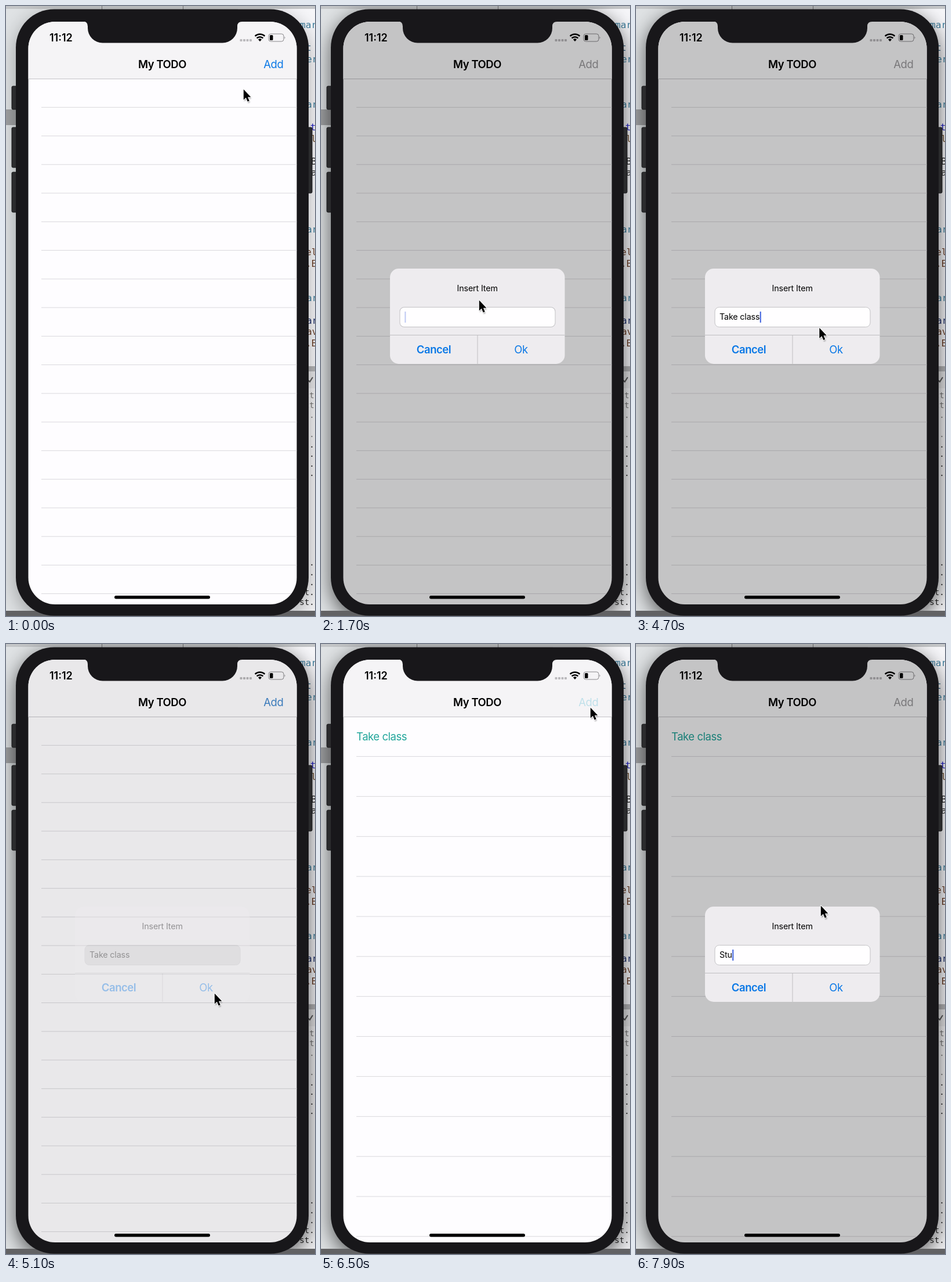
Write an HTML page that moves like this. It is 533x1050 px and loops after 8 s.

```html
<!DOCTYPE html>
<html lang="en">
<head>
<meta charset="utf-8">
<title>My TODO</title>
<style>
  html, body { margin: 0; width: 100%; height: 100%; overflow: hidden; background: #dfe2e4; }
  svg { display: block; width: 100%; height: 100%; }
  text { font: 18.5px Inter, Roboto, sans-serif; letter-spacing: -.45px; white-space: pre; }
  .bold { font-weight: 600; }
  .small { font-size: 14.3px; letter-spacing: -.15px; }
  .mid { text-anchor: middle; }
  .blue { fill: #0a78e6; }
  .code { font: 16.2px "DejaVu Sans Mono", monospace; letter-spacing: 0; }
  .log { font: 14.2px "DejaVu Sans Mono", monospace; letter-spacing: 0; }
</style>
</head>
<body>
<svg viewBox="0 0 533 1050" preserveAspectRatio="none">
  <defs>
    <filter id="blur" x="-30%" y="-30%" width="160%" height="160%"><feGaussianBlur stdDeviation="17"/></filter>
    <filter id="soft" x="-50%" y="-50%" width="200%" height="200%"><feGaussianBlur stdDeviation="1.2"/></filter>
    <clipPath id="screen"><rect x="38.5" y="27" width="463" height="1003" rx="46"/></clipPath>
    <path id="arrow" d="M0 0V18L4.1 14.3 6.9 21 10 19.7 7.2 13.2H12.6Z"/>
  </defs>

  <g id="desktop">
    <rect width="533" height="1050" fill="#dfe2e4"/>
    <rect x="400" width="133" height="1050" fill="#f6f6f9"/>
    <rect width="533" height="5" fill="#c4c6c8"/>
    <path d="M165.500 0V6M305.500 0V6" stroke="#777"/>
    <rect y="178" width="40" height="27" fill="#a0a1a3"/>
    <rect x="500" y="620" width="33" height="9" fill="#b4b4b6"/>
    <rect x="500" y="629" width="33" height="29" fill="#e6e6e8"/>
    <rect x="500" y="658" width="33" height="392" fill="#f1f1f3"/>
    <path d="M521 644l3 3 5-8" fill="none" stroke="#555" stroke-width="2"/>
  </g>
  <rect id="shadow" x="17" y="15" width="505" height="1044" rx="66" filter="url(#blur)"/>
  <rect y="1041" width="533" height="9" fill="#626264"/>

  <g fill="#2b2b2d" stroke="#161618">
    <rect x="10" y="138" width="12" height="40" rx="2"/>
    <rect x="10" y="209" width="12" height="69" rx="2"/>
    <rect x="10" y="286" width="12" height="69" rx="2"/>
    <rect x="516" y="209" width="12" height="113" rx="2"/>
  </g>
  <rect x="17" y="5.500" width="505" height="1044" rx="66" fill="#18171a"/>

  <g clip-path="url(#screen)">
    <rect x="38" y="27" width="464" height="1003" fill="#fefdff"/>
    <rect id="nav" x="38" y="27" width="464" height="98.500"/>
    <path d="M38 125.500H502" stroke="#c4c3c7"/>
    <path id="rows" stroke="#d9d8dc"/>
    <text id="item" x="61" y="165.500" fill="#22a69b">Take class</text>
    <text class="bold" x="75" y="61" style="font-size:18px;letter-spacing:0">11:12</text>
    <text class="bold mid" x="269.500" y="107.300">My TODO</text>
    <text id="add" class="mid" x="461.300" y="107.300">Add</text>
    <g fill="#bbbabd">
      <rect x="403.500" y="57" width="4" height="4" rx="1"/><rect x="409" y="57" width="4" height="4" rx="1"/>
      <rect x="414.500" y="57" width="4" height="4" rx="1"/><rect x="420" y="57" width="4" height="4" rx="1"/>
    </g>
    <path d="M438 61l-3-3.200a4.300 4.300 0 0 1 6 0Z"/>
    <path d="M432.600 55.300a7.800 7.800 0 0 1 10.800 0M429.600 51.900a12.200 12.200 0 0 1 16.800 0" fill="none" stroke="#000" stroke-width="2.500"/>
    <rect x="453" y="48" width="26" height="13" rx="3.800" fill="none" stroke="#88878a"/>
    <rect x="455" y="50" width="5.500" height="9" rx="1.500"/>
    <path d="M480.500 52.500q2 2 0 4Z" fill="#88878a"/>
    <rect id="dim" x="38" y="27" width="464" height="1003"/>
    <g id="alert">
      <rect x="119" y="452" width="301.500" height="164" rx="15" fill="#eeecef"/>
      <text class="small mid" x="269.700" y="491.300">Insert Item</text>
      <rect id="field" x="136" y="518.500" width="268" height="34" rx="7.500" stroke="#c2c1c4"/>
      <path d="M119 566.500H420.500M270 566.500V616" stroke="#bfbec1"/>
      <text id="typed" class="small" x="144" y="540"></text>
      <rect id="caret" y="526" width="2" height="19" fill="#3c5fdc"/>
      <text class="bold mid blue" x="194.500" y="598.300">Cancel</text>
      <text class="mid blue" x="345" y="598.300">Ok</text>
    </g>
    <rect x="187" y="1015" width="165" height="5.500" rx="2.750"/>
  </g>
  <path d="M130 26H133Q141 27 141 35V38A25.500 25.500 0 0 0 166.500 63.500H373.500A25.500 25.500 0 0 0 399 38V35Q399 27 407 27V26Z" fill="#18171a"/>

  <g id="cursor">
    <use href="#arrow" x="1" y="2.500" filter="url(#soft)" opacity=".4"/>
    <use href="#arrow" stroke="#fff" stroke-width="2" stroke-linejoin="round"/>
    <use href="#arrow"/>
  </g>
</svg>

<script>
const $ = id => document.getElementById(id);
const LOOP = 8000, STEP = 100;

// Visible edge of the editor and console behind the phone: [x, baseline, text, colour]
const code = [
  [507, 38, 'mar', '#3c7d9c'], [517, 77, 't', '#24587a'], [518, 97, 'er', '#3c7d9c'],
  [518, 175, 'ar', '#3c7d9c'], [515, 214, 'it', '#2323c8'], [526, 234, 'l', '#6a4a2a'],
  [526, 273, 'B', '#222'], [526, 292, 'a', '#222'], [518, 390, 'ar', '#3c7d9c'],
  [517, 429, 'el', '#6b3f28'], [517, 449, '.B', '#6b3f28'], [518, 508, 'ar', '#3c7d9c'],
  [518, 547, 'ar', '#1d2f6b'], [518, 566, 'av', '#6b3f28'], [517, 586, '.B', '#6b3f28'],
];
const log = [[675, 'ct', '#777'], [692, 'ct', '#777'], [709, ' .', '#777'], [742, ' .', '#777'],
  ...[760, 776, 793, 809, 963, 980, 997].map(y => [y, ' .', '#222']),
  [1014, 't.', '#222'], [1031, 'st.', '#222']];

function addText(cls, x, y, str, fill) {
  const el = document.createElementNS('http://www.w3.org/2000/svg', 'text');
  el.setAttribute('class', cls);
  set(el, { x, y, fill });
  el.textContent = str;
  $('desktop').append(el);
}
function set(el, attrs) {
  for (const name in attrs) el.setAttribute(name, attrs[name]);
}
code.forEach(([x, y, str, fill]) => addText('code', x, y, str, fill));
log.forEach(([y, str, fill]) => addText('log', 532 - 8.6 * str.length, y, str, fill));

const rowPath = (first, gap) => {
  let d = '';
  for (let y = first; y < 1030; y += gap) d += `M61 ${y.toFixed(1)}H502`;
  return d;
};
const emptyRows = rowPath(174.4, 49.25), itemRows = rowPath(193.6, 68.85);

// Cursor stops: [time, x, y]
const stops = [[0, 409, 142], [300, 468, 96], [900, 468, 96], [1600, 272, 505], [4500, 272, 505],
  [4900, 359, 600], [5700, 359, 600], [6200, 464, 108], [6500, 464, 108], [6700, 462, 112],
  [7300, 318, 449], [LOOP, 318, 449]];
// Typing: [start of dialog, text, time of each letter]
const dialogs = [
  [600, 'Take class', [3200, 3600, 3700, 3800, 4000, 4100, 4200, 4300, 4400, 4500]],
  [6500, 'Stu', [7600, 7800, 7900]],
];

const clamp = v => Math.max(0, Math.min(1, v));
const mix = (a, b, p) => `rgb(${a.map((v, i) => Math.round(v + (b[i] - v) * p))})`;
const BLUE = [10, 120, 230], PRESSED = [191, 224, 234], GREY = [155, 154, 157];
const settle = ms => clamp(1 - Math.exp(-(ms - 23) / 77));
const CLOSE = 5000;

function cursorAt(t) {
  const i = stops.findIndex(s => s[0] > t);
  const [t0, x0, y0] = stops[i - 1], [t1, x1, y1] = stops[i];
  const u = (t - t0) / (t1 - t0), e = u * u * (3 - 2 * u);
  return [x0 + (x1 - x0) * e, y0 + (y1 - y0) * e];
}

// Caret stays on after the dialog opens, then fades out and in once a second
function caretAlpha(t, start, times) {
  if (times.some(k => t >= k && t - k < 700)) return 1;
  const s = t - start;
  if (s < 500) return 1;
  const u = (s - 500) % 1000;
  return u < 500 ? clamp(1 - u / 300) : clamp((u - 500) / 300);
}

function render(t) {
  const [start, text, times] = dialogs[t < 6500 ? 0 : 1];
  const closing = t >= CLOSE && t < 6500;
  let p = closing ? 1 - settle(t - CLOSE) : settle(t - start);
  if (p < .01) p = 0;

  const pressed = t >= start && !closing;
  const hasItem = t >= 5400;
  set($('shadow'), { opacity: t < 600 ? .3 : .62 });
  set($('nav'), { fill: mix([245, 244, 246], [254, 253, 255], clamp(p * 3)) });
  set($('rows'), { d: hasItem ? itemRows : emptyRows });
  set($('item'), { opacity: hasItem ? 1 : 0 });
  set($('add'), { fill: mix(pressed ? PRESSED : BLUE, GREY, p) });
  set($('dim'), { opacity: .228 * p });

  const scale = closing ? 1 : 1 + .2 * (1 - p);
  set($('alert'), {
    opacity: p,
    transform: `translate(269.75 534) scale(${scale}) translate(-269.75 -534)`,
  });
  set($('field'), { fill: mix([180, 179, 183], [255, 254, 255], p) });
  $('typed').textContent = text.slice(0, times.filter(k => k <= t).length);
  const width = $('typed').textContent ? $('typed').getComputedTextLength() : 0;
  set($('caret'), { x: 144.4 + width, opacity: closing ? 0 : caretAlpha(t, start, times) });

  const [x, y] = cursorAt(t);
  set($('cursor'), { transform: `translate(${x + .8} ${y + 1.5})` });
}

const origin = performance.now();
function tick() {
  const t = (performance.now() - origin) % LOOP;
  render(Math.floor(t / STEP) * STEP);
  requestAnimationFrame(tick);
}
tick();
</script>
</body>
</html>
```
